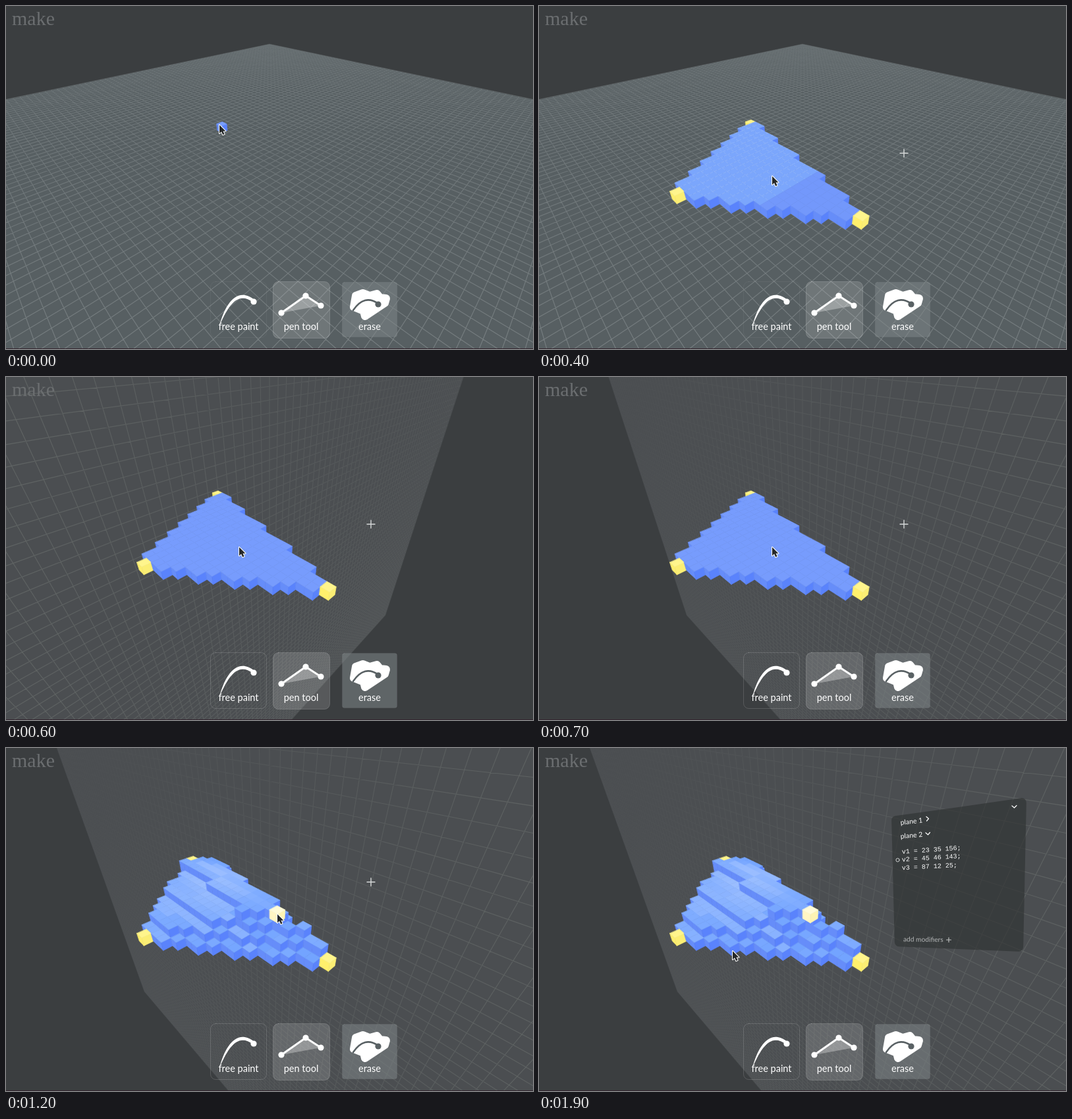
Recreate the animation shown at these times as an HTML page with a canvas. Size 800x522 px, loop 2000 ms.

```html
<!DOCTYPE html>
<html lang="en">
<head>
<meta charset="utf-8">
<title>make</title>
<style>
  html, body { margin: 0; width: 100%; height: 100%; overflow: hidden; background: #3b3e40; }
  canvas { display: block; }
</style>
</head>
<body>
<canvas id="stage" width="800" height="522"></canvas>
<script>
const ctx = document.getElementById('stage').getContext('2d');
const STEP = 100, STEPS = 20;

// Isometric-direction perspective camera at (CAM, CAM, CAM), looking at the origin.
const CAM = 19.15, FOCAL = 452, HALF = 50, NEAR = 2;
const depth = ([x, y, z]) => (3 * CAM - x - y - z) / Math.sqrt(3);
const project = p => {
  const s = FOCAL / depth(p), [x, y, z] = p;
  return [400 + s * (x - z) / Math.SQRT2, 261 - s * (2 * y - x - z) / Math.sqrt(6)];
};
const mix = (a, b, t) => a.map((v, i) => v + (b[i] - v) * t);
const clamp = (v, lo, hi) => Math.max(lo, Math.min(hi, v));

function clipNear(points) {
  const out = [];
  points.forEach((a, i) => {
    const b = points[(i + 1) % points.length], da = depth(a) - NEAR, db = depth(b) - NEAR;
    if (da >= 0) out.push(a);
    if (da * db < 0) out.push(mix(a, b, da / (da - db)));
  });
  return out;
}

function trace(points) {
  points.forEach(([x, y], i) => i ? ctx.lineTo(x, y) : ctx.moveTo(x, y));
}

function fillShape(points, color, seam = 0) {
  ctx.beginPath();
  trace(points);
  ctx.closePath();
  ctx.fillStyle = color;
  ctx.fill();
  if (seam) {
    ctx.lineWidth = seam;
    ctx.strokeStyle = color;
    ctx.stroke();
  }
}

function strokePath(d, color, width) {
  ctx.strokeStyle = color;
  ctx.lineWidth = width;
  ctx.stroke(new Path2D(d));
}

function dot(x, y, r, color) {
  ctx.fillStyle = color;
  ctx.beginPath();
  ctx.arc(x, y, r, 0, 7);
  ctx.fill();
}

// ---- Grid planes ----
const planes = {
  floor: () => (a, b) => [a, 0, b],
  xWall: c => (a, b) => [c, a, b],
  zWall: c => (a, b) => [a, b, c]
};

function lineFade(kind) {
  const [ends, far, near] = {
    floor: [[0, 58, 0, 522], .12, .22],
    xWall: [[660, 0, 0, 0], .05, .18],
    zWall: [[140, 0, 800, 0], .01, .17]
  }[kind];
  const g = ctx.createLinearGradient(...ends);
  const tint = kind === 'floor' ? '232,238,238' : '190,200,185';
  g.addColorStop(0, `rgba(${tint},${far})`);
  g.addColorStop(1, `rgba(${tint},${near})`);
  return g;
}

function drawGrid(kind, offset) {
  const at = planes[kind](offset);
  const corners = [at(-HALF, -HALF), at(HALF, -HALF), at(HALF, HALF), at(-HALF, HALF)];
  fillShape(clipNear(corners).map(project), kind === 'floor' ? '#575f62' : '#4b4e51');
  ctx.beginPath();
  for (let n = -HALF; n <= HALF; n++) {
    trace(clipNear([at(n, -HALF), at(n, HALF)]).map(project));
    trace(clipNear([at(-HALF, n), at(HALF, n)]).map(project));
  }
  ctx.strokeStyle = lineFade(kind);
  ctx.lineWidth = 1.1;
  ctx.stroke();
}

// ---- Voxels: a map of columns, each vertex being [column, row, level] ----
const BACK = [-14, -4, 0], LEFT = [-6, 11, 0], RIGHT = [9, 1, 0];
const PEAK = [-12.3, 1, 3], CREST = [3.5, 1.9, 3];
const BLUE = { left: '#668df9', right: '#5a83fc' };
const YELLOW = { top: '#fff58c', left: '#fff06c', right: '#fbee74' };
const PALE = { top: '#fffbd8', left: '#fff6c4', right: '#fdf4b4' };
const key = (i, k) => Math.round(i) + ',' + Math.round(k);
const center = ([i, k]) => [i - .09, k + .48];

const cross = (a, b, p) => (b[0] - a[0]) * (p[1] - a[1]) - (b[1] - a[1]) * (p[0] - a[0]);

// Fills a triangle together with its rasterised edges, half a cell wide.
function fillTriangle(heights, a, b, c) {
  const corners = [a, b, c], area = cross(a, b, c), side = Math.sign(area) || 1;
  const range = axis => {
    const values = corners.map(p => p[axis]);
    return [Math.ceil(Math.min(...values)), Math.max(...values)];
  };
  const [i0, i1] = range(0), [k0, k1] = range(1);
  const inside = p => corners.every((from, n) => {
    const to = corners[(n + 1) % 3];
    const reach = Math.max(Math.abs(to[0] - from[0]), Math.abs(to[1] - from[1]));
    return side * cross(from, to, p) >= -reach / 2;
  });
  const levels = corners.map(p => p[2]);
  for (let i = i0; i <= i1; i++) {
    for (let k = k0; k <= k1; k++) {
      const p = [i, k];
      if (!inside(p)) continue;
      const wb = -cross(a, c, p) / (area || 1), wc = cross(a, b, p) / (area || 1);
      const level = a[2] + wb * (b[2] - a[2]) + wc * (c[2] - a[2]);
      const h = 1 + Math.round(clamp(level, Math.min(...levels), Math.max(...levels)));
      heights[key(i, k)] = Math.max(heights[key(i, k)] || 0, h);
    }
  }
}

function modelAt(step) {
  const heights = {}, marks = {};
  const add = (...corners) => fillTriangle(heights, ...corners);
  const mark = ([i, k, level], paint) => {
    heights[key(i, k)] = level + 1;
    marks[key(i, k)] = paint;
  };
  if (step === 0) {
    heights[key(-13, -4)] = 1;
    return { heights, marks };
  }
  const second = step < 2 ? mix(BACK, LEFT, .5) : LEFT;
  const third = step < 3 ? second : step < 4 ? mix(LEFT, RIGHT, .7) : RIGHT;
  add(BACK, second, third);
  if (step >= 8) {
    const peak = [PEAK[0], PEAK[1], Math.min(3, step - 7)];
    if (step < 12) {
      add(LEFT, RIGHT, peak);
      add(BACK, RIGHT, peak);
    } else {
      add(LEFT, peak, CREST);
      add(LEFT, RIGHT, CREST);
      add(BACK, peak, CREST);
    }
    mark(peak, YELLOW);
  }
  mark(BACK, step >= 8 ? PALE : YELLOW);
  if (step >= 2) mark(LEFT, YELLOW);
  if (step >= 4) mark(RIGHT, YELLOW);
  return { heights, marks };
}

function topColor(i, k, step) {
  if (step < 4) return '#789dfd';
  if (step === 4) return i <= 1 ? '#7ba6fc' : '#7398fb';
  if (step < 8) return '#779cfd';
  const noise = Math.abs(Math.sin(Math.floor(i / 5) * 12.9 + k * 78.2) * 43758.5) % 1;
  const glow = Math.exp(-((i + 6) ** 2 + (k - 2) ** 2) / 50);
  return `hsl(219,100%,${71 + noise * 5 + glow * 5}%)`;
}

function drawFaces(x, y, z, h, paint, show = {}) {
  const a = .5, quad = (color, ...pts) => fillShape(pts.map(project), color, .7);
  const x0 = x - a, x1 = x + a, z0 = z - a, z1 = z + a, y0 = y - h;
  if (show.left !== false) quad(paint.left, [x0, y, z1], [x1, y, z1], [x1, y0, z1], [x0, y0, z1]);
  if (show.right !== false) quad(paint.right, [x1, y, z1], [x1, y, z0], [x1, y0, z0], [x1, y0, z1]);
  if (show.top !== false) quad(paint.top, [x0, y, z0], [x1, y, z0], [x1, y, z1], [x0, y, z1]);
}

function drawModel(step) {
  const { heights, marks } = modelAt(step);
  for (let i = -18; i <= 12; i++) {
    for (let k = -8; k <= 14; k++) {
      const h = heights[key(i, k)];
      if (!h) continue;
      const [x, z] = center([i, k]), blue = { top: topColor(i, k, step), ...BLUE };
      const leftH = heights[key(i, k + 1)] || 0, rightH = heights[key(i + 1, k)] || 0;
      for (let y = 1; y <= h; y++) {
        const paint = y === h && marks[key(i, k)] || blue;
        drawFaces(x, y, z, 1, paint, { left: leftH < y, right: rightH < y, top: y === h });
      }
      if (step === 4 && i <= 1 && !marks[key(i, k)]) {
        ctx.beginPath();
        trace([[x - .5, 1, z + .5], [x - .5, 1, z - .5], [x + .5, 1, z - .5]].map(project));
        ctx.setLineDash([4, 3]);
        ctx.strokeStyle = 'rgba(190,215,255,.35)';
        ctx.lineWidth = .8;
        ctx.stroke();
        ctx.setLineDash([]);
      }
    }
  }
  if (step >= 12) {
    const [x, z] = center(CREST);
    drawFaces(x, CREST[2] + 1, z, 1, PALE);
  }
  if (step === 5) {
    const glow = ctx.createRadialGradient(361, 291, 0, 361, 291, 26);
    glow.addColorStop(0, 'rgba(150,195,255,.75)');
    glow.addColorStop(.3, 'rgba(140,180,255,.3)');
    glow.addColorStop(1, 'rgba(140,180,255,0)');
    dot(361, 291, 26, glow);
  }
  if (step === 10) {
    fillShape([[356, 221], [399, 237], [414, 246], [407, 252], [372, 238]], '#f4f7ff');
  }
}

// ---- Interface ----
function label(text, x, y, size, { family = 'Lato, sans-serif', color = '#fff', align = 'left', turn = 0 } = {}) {
  ctx.save();
  ctx.translate(x, y);
  ctx.rotate(turn * Math.PI / 180);
  ctx.font = `${size}px ${family}`;
  ctx.textAlign = align;
  ctx.fillStyle = color;
  ctx.fillText(text, 0, 0);
  ctx.restore();
}

function button(x, y, size, radius, fill, border) {
  ctx.beginPath();
  ctx.roundRect(x, y, size, size, radius);
  ctx.fillStyle = fill;
  ctx.fill();
  ctx.strokeStyle = border;
  ctx.lineWidth = 1;
  ctx.stroke();
}

function drawToolbar(step) {
  button(310.5, 419.5, 85, 8, 'rgba(255,255,255,0)', `rgba(255,255,255,${step < 5 ? .05 : .15})`);
  button(405.5, 419.5, 86, 8, 'rgba(250,255,255,.14)', 'rgba(255,255,255,.17)');
  button(510.5, 420.5, 83, 3, 'rgba(128,136,138,.52)', 'rgba(255,255,255,.05)');

  ctx.fillStyle = '#fff';
  ctx.fill(new Path2D('M324 487C332 455 350 426 377 447L375 451C352 433 337 456 324 487Z'));
  dot(376, 450, 4.6, '#fff');

  const pen = [[418, 467], [455, 441], [478, 456]];
  fillShape(pen, 'rgba(255,255,255,.3)');
  strokePath('M418 467L455 441L478 456', '#fff', 3);
  pen.forEach(([x, y]) => dot(x, y, 4.6, '#fff'));

  const scribble = 'M528 458L531 441L542 437L552 441L563 438L568 444L577 445L575 452L557 464L545 472L543 464Z';
  ctx.fillStyle = '#fff';
  ctx.fill(new Path2D(scribble));
  strokePath(scribble, '#fff', 12);
  strokePath('M527 463Q544 438 565 453', '#596164', 2.5);
  dot(565, 454, 4.6, '#596164');

  label('free paint', 353, 493, 14.5, { align: 'center' });
  label('pen tool', 448, 493, 14.5, { align: 'center' });
  label('erase', 552, 493, 14.5, { align: 'center' });
}

function drawPanel() {
  const corners = [[535, 104], [740, 75], [735, 310], [540, 302]];
  ctx.beginPath();
  ctx.moveTo(637, 90);
  [1, 2, 3, 0].forEach(n => ctx.arcTo(...corners[n], ...corners[(n + 1) % 4], 7));
  ctx.closePath();
  ctx.fillStyle = 'rgba(47,50,51,.66)';
  ctx.fill();

  label('plane 1', 549, 117, 10.5, { turn: -6 });
  label('plane 2', 549, 138, 10.5, { turn: -5 });
  strokePath('M588 104.5l3.5 3l-3 3.5M587 129l3.5 3l3-3.5M718 88l3.5 3l3.5-3.5', '#fff', 1.2);

  const mono = { family: '"Liberation Mono", monospace', turn: -4 };
  label('v1 = 23 35 156;', 551, 161, 10, mono);
  label('v2 = 45 46 143;', 551, 173, 10, { ...mono, turn: -3.6 });
  label('v3 = 87 12 25;', 551, 185.5, 10, { ...mono, turn: -3 });
  ctx.beginPath();
  ctx.arc(544.5, 170.5, 2.6, 0, 7);
  ctx.strokeStyle = '#d5d7d7';
  ctx.lineWidth = 1;
  ctx.stroke();

  label('add modifiers', 553, 294.5, 10.2, { color: '#b4b6b7', turn: .6 });
  strokePath('M618.5 292h7M622 288.5v7', '#c4c6c6', 1.1);
}

function drawCursor([x, y]) {
  ctx.save();
  ctx.translate(x, y);
  const arrow = new Path2D('M0 0V13L3 10.3L5.2 15L7.6 14L5.5 9.5H9.5Z');
  ctx.strokeStyle = '#fff';
  ctx.lineWidth = 2;
  ctx.stroke(arrow);
  ctx.fillStyle = '#25282a';
  ctx.fill(arrow);
  ctx.restore();
}

const cursorPath = [
  [324, 181], [262, 230], [208, 288], [400, 312], [354, 259],
  [354, 259], [354, 259], [354, 259], [285, 178], [340, 212],
  [416, 250], [414, 252], [412, 253], [470, 215], [519, 187],
  [519, 187], [519, 187], [440, 235], [345, 285], [294, 309]
];

function draw(step) {
  ctx.lineCap = ctx.lineJoin = 'round';
  ctx.fillStyle = '#3b3e40';
  ctx.fillRect(0, 0, 800, 522);

  if (step < 5) drawGrid('floor', 0);
  else if (step < 7) drawGrid('xWall', 0);
  else drawGrid('zWall', clamp((step - 7) * 1.5, 0, 3));

  label('make', 9, 28.5, 30, { family: '"Liberation Serif", serif', color: '#6b6e70' });
  drawModel(step);

  if (step >= 4 && step < 13) {
    const y = step < 8 ? 224 : step < 9 ? 214 : 204;
    strokePath(`M548 ${y}h12M554 ${y - 6}v12`, '#d8dada', 1.4);
  }
  if (step >= 14) drawPanel();
  if (step >= 13 && step < 17) {
    drawFaces(10.56, 11.12, 2.7, 1, { top: '#6079e8', left: '#546edf', right: '#4e68d8' });
  }
  drawToolbar(step);
  ctx.fillStyle = '#33262f';
  ctx.fillRect(0, 521, 800, 1);
  drawCursor(cursorPath[step]);
}

let shown = -1;
const start = performance.now();
function tick() {
  const step = Math.floor((performance.now() - start) / STEP) % STEPS;
  if (step !== shown) draw(shown = step);
  requestAnimationFrame(tick);
}
tick();
</script>
</body>
</html>
```
